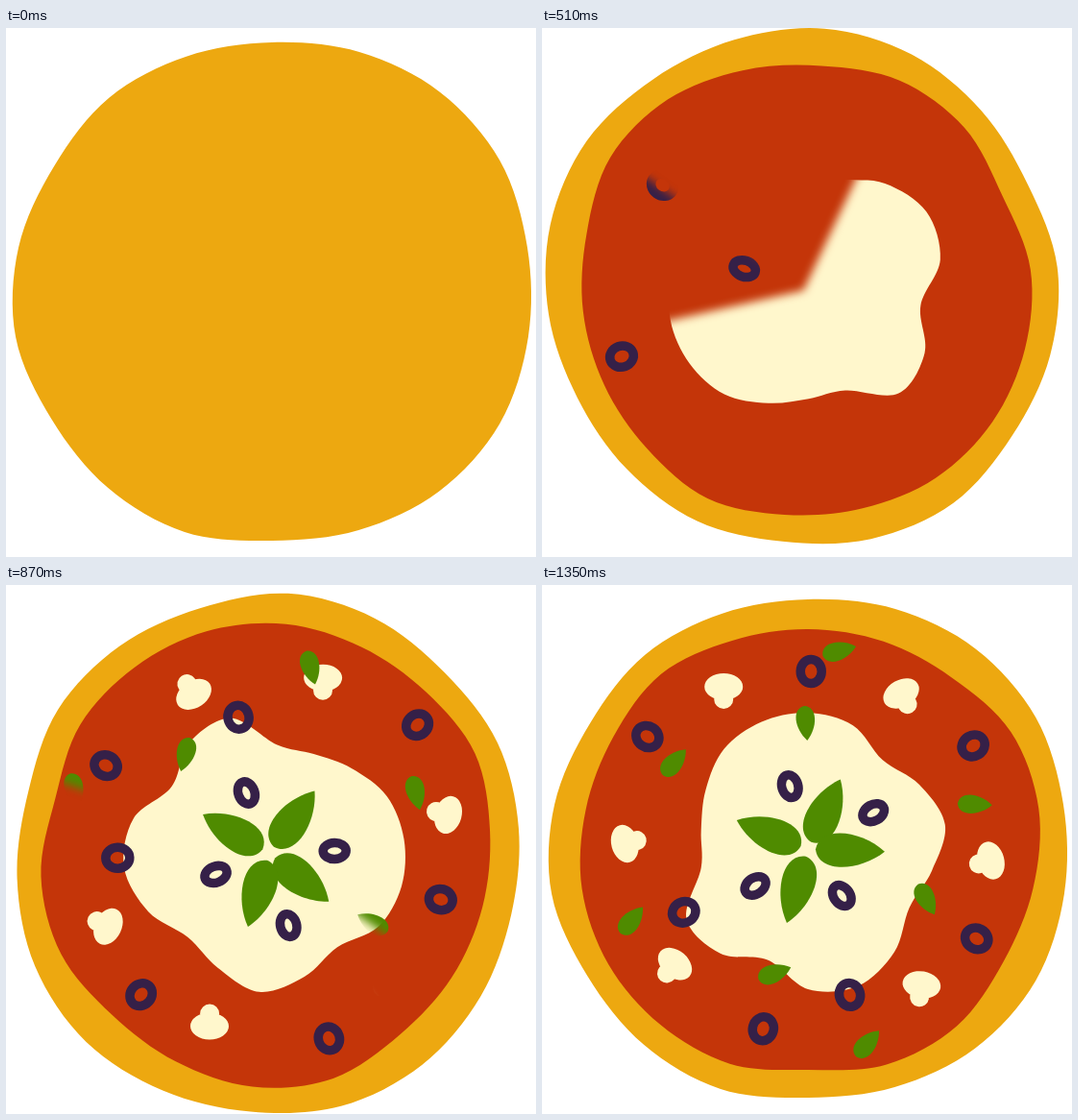
Recreate the animation shown at these times as an HTML page with a canvas. Size 552x551 px, loop 2280 ms.

```html
<!DOCTYPE html>
<html lang="en">
<head>
<meta charset="utf-8">
<title>Pizza</title>
<style>
html, body { margin: 0; width: 100%; height: 100%; overflow: hidden; background: #fff; }
canvas { display: block; }
</style>
</head>
<body>
<canvas id="stage" width="552" height="551"></canvas>
<script>
const W = 552, H = 551, LOOP = 2280, SPIN = 1350, STEP = 30;
const TAU = 2 * Math.PI, RAD = Math.PI / 180;
const CENTER = [277, 275], PIVOT = [274, 276];
const YELLOW = '#eda810', RED = '#c43509', CREAM = '#fff7cc', GREEN = '#4f8b00', PURPLE = '#352048';

const stage = document.getElementById('stage').getContext('2d');
const c = new OffscreenCanvas(W, H).getContext('2d');

const clamp = v => Math.min(1, Math.max(0, v));
const progress = (t, [from, to]) => clamp((t - from) / (to - from));

// Angles run clockwise from the top
const polar = (angle, r) => [r * Math.sin(angle * RAD), -r * Math.cos(angle * RAD)];

// Smooth closed outline through radii at equal angles
function blob(color, radii) {
  const n = radii.length;
  const at = i => polar(i * 360 / n, radii[(i + n) % n]);
  c.beginPath();
  c.moveTo(...at(0));
  for (let i = 0; i < n; i++) {
    const [p, q, r, s] = [-1, 0, 1, 2].map(k => at(i + k));
    c.bezierCurveTo(q[0] + (r[0] - p[0]) / 6, q[1] + (r[1] - p[1]) / 6,
      r[0] - (s[0] - q[0]) / 6, r[1] - (s[1] - q[1]) / 6, ...r);
  }
  c.fillStyle = color;
  c.fill();
}

function place(angle, r, tilt, draw) {
  c.save();
  c.translate(...polar(angle, r));
  c.rotate(tilt * RAD);
  draw();
  c.restore();
}

function ring(rx, ry) {
  c.beginPath();
  c.ellipse(0, 0, rx, ry, 0, 0, TAU);
  c.strokeStyle = PURPLE;
  c.lineWidth = 9.5;
  c.stroke();
}

function leaf(half, width) {
  c.beginPath();
  c.moveTo(-half, 0);
  c.bezierCurveTo(-half * .9, -width * 1.4, half * .3, -width * 1.2, half, 0);
  c.bezierCurveTo(half * .3, width * 1.2, -half * .9, width * 1.4, -half, 0);
  c.fillStyle = GREEN;
  c.fill();
}

function mushroom() {
  c.beginPath();
  c.ellipse(0, -4, 20, 14, 0, 0, TAU);
  c.ellipse(0, 9, 10, 10, 0, 0, TAU);
  c.fillStyle = CREAM;
  c.fill();
}

const crust = () => blob(YELLOW, [260, 266, 272, 274, 270, 271, 274, 271, 264,
  259, 266, 266, 265, 271, 268, 262, 264, 261]);

const sauce = () => blob(RED, [229, 230, 233, 244, 244, 238, 235, 241, 239,
  230, 238, 239, 240, 239, 235, 234, 238, 231]);

const cheese = () => blob(CREAM, [142, 137, 121, 134, 145, 131, 122, 140, 152,
  146, 123, 142, 146, 113, 113, 123, 136, 141]);

function olives() {
  [[1, 185], [58, 203], [118, 199], [164, 158], [194, 193], [243, 145], [305, 204]]
    .forEach(([angle, r]) => place(angle, r, angle, () => ring(11, 12.5)));
  [[61, 78], [144, 60], [235, 67], [344, 68]]
    .forEach(([angle, r]) => place(angle, r, angle, () => ring(8.5, 12)));
}

function mushrooms() {
  [[32, -30], [94, 75], [141, 10], [229, 41], [272, -105], [332, 0]]
    .forEach(([angle, tilt]) => place(angle, 187, tilt, mushroom));
}

function leaves() {
  [[9, 209, -15], [75, 180, 3], [113, 134, 62], [163, 212, -48],
   [195, 134, -20], [248, 198, -50], [303, 166, -48], [359, 131, 85]]
    .forEach(([angle, r, tilt]) => place(angle, r, tilt, () => leaf(18, 10)));
}

function basil(t) {
  const size = progress(t, [540, 720]);
  c.scale(size, size);
  [25, 92, 196, 292].forEach(angle => place(angle, 44, angle - 90, () => leaf(36, 18)));
}

// Each topping is wiped in over its span of milliseconds
const layers = [
  { draw: crust },
  { draw: sauce, span: [150, 420] },
  { draw: cheese, span: [265, 645] },
  { draw: olives, span: [450, 720] },
  { draw: mushrooms, span: [630, 900] },
  { draw: leaves, span: [595, 1100] },
  { draw: basil }
];

function wipe(shown) {
  const top = -TAU / 4;
  c.globalCompositeOperation = 'destination-in';
  c.filter = 'blur(5px)';
  c.fillStyle = '#000';
  c.beginPath();
  c.moveTo(0, 0);
  c.arc(0, 0, 420, top, top - shown * TAU, true);
  c.fill();
}

function drawLayer({ draw, span }, t, turn) {
  const shown = span ? progress(t, span) : 1;
  if (!shown) return;
  const lag = 100 * (1 - shown) ** 2; // toppings catch up with the crust as they appear
  c.clearRect(0, 0, W, H);
  c.save();
  c.translate(...PIVOT);
  c.rotate((lag - turn) * RAD);
  c.translate(CENTER[0] - PIVOT[0], CENTER[1] - PIVOT[1]);
  c.save();
  draw(t);
  c.restore();
  if (shown < 1) wipe(shown);
  c.restore();
  stage.drawImage(c.canvas, 0, 0);
}

function render(now) {
  const t = Math.floor(now % LOOP / STEP) * STEP;
  const k = clamp(t / SPIN);
  const turn = 360 * k * k * (3 - 2 * k);
  stage.fillStyle = '#fff';
  stage.fillRect(0, 0, W, H);
  layers.forEach(layer => drawLayer(layer, t, turn));
}

const began = performance.now();
(function tick() {
  render(performance.now() - began);
  requestAnimationFrame(tick);
})();
</script>
</body>
</html>
```
